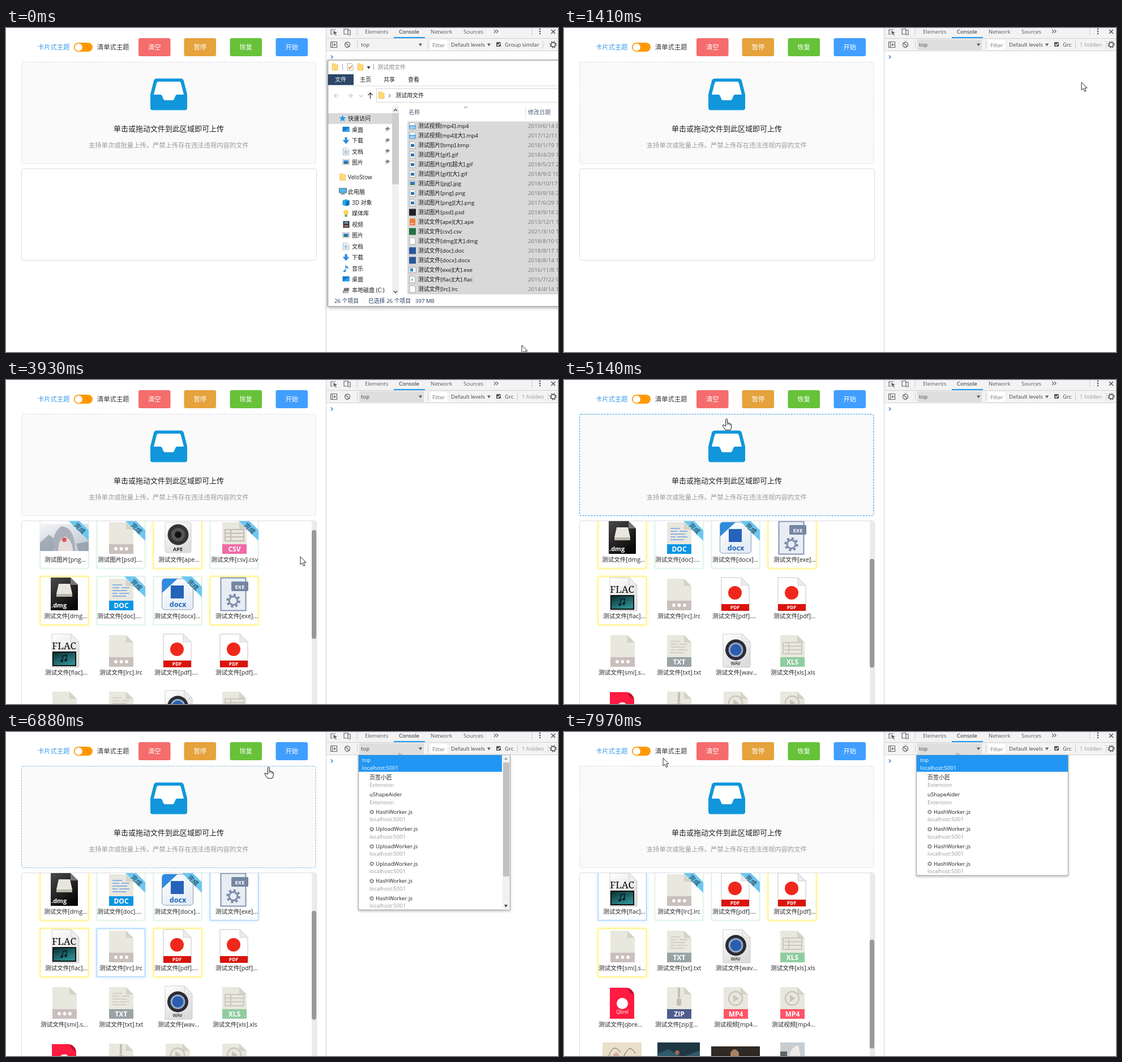
Recreate the animation shown at these times as an HTML page. Size 975 by 574 pixels, loop 8000 ms.

```html
<!DOCTYPE html>
<html lang="zh-CN">
<head>
<meta charset="utf-8">
<title>上传演示</title>
<style>
html, body { margin: 0; width: 100%; height: 100%; overflow: hidden; background: #fff; }
svg { display: block; width: 100vw; height: 100vh; }
text { font-family: "Open Sans", "Noto Sans CJK SC", "Noto Sans CJK", sans-serif; }
.frame { fill: #fff; stroke: none; stroke-width: 1.5; }
.hash { stroke: #fff27a; filter: drop-shadow(0 0 3px #fff59a); }
.send { stroke: #a9d5ff; filter: drop-shadow(0 0 3px #cfe8ff); }
.done { stroke: #d8f1e0; filter: drop-shadow(0 0 2px #eef9f1); }
</style>
</head>
<body>
<svg id="stage" viewBox="0 0 975 574"></svg>
<script>
const LOOP = 8000, STEP = 109.3;

// Drawing helpers
const text = (x, y, s, size = 10, fill = '#1a1a1a', more = '') =>
  `<text x="${x}" y="${y}" font-size="${size}" fill="${fill}" ${more}>${s}</text>`;
const mid = (x, y, s, size, fill, more = '') => text(x, y, s, size, fill, 'text-anchor="middle" ' + more);
const box = (x, y, w, h, fill, more = '') =>
  `<rect x="${x}" y="${y}" width="${w}" height="${h}" fill="${fill}" ${more}/>`;
const path = (d, fill = 'none', more = '') => `<path d="${d}" fill="${fill}" ${more}/>`;
const line = (d, color, width = 1) => path(d, 'none', `stroke="${color}" stroke-width="${width}"`);
const disc = (x, y, r, fill, more = '') => `<circle cx="${x}" cy="${y}" r="${r}" fill="${fill}" ${more}/>`;
const group = (x, y, inner, more = '') => `<g transform="translate(${x} ${y})" ${more}>${inner}</g>`;
const gear = (x, y, r, color) =>
  disc(x, y, r * .62, 'none', `stroke="${color}" stroke-width="${r * .24}"`) +
  disc(x, y, r * .88, 'none', `stroke="${color}" stroke-width="${r * .3}" stroke-dasharray="${r * .3456}"`);
const gradient = (id, a, b) =>
  `<linearGradient id="${id}" x2=".6" y2="1"><stop stop-color="${a}"/><stop offset="1" stop-color="${b}"/></linearGradient>`;

const defs = `<defs>
  <clipPath id="listClip"><path d="M28 250h512v324h-512z"/></clipPath>
  <clipPath id="cardClip"><path d="M0 0h86v86h-86z"/></clipPath>
  <clipPath id="groupClip"><path d="M880 20h16v20h-16z"/></clipPath>` +
  gradient('artFill', '#f3f3f4', '#c3cdd6') + gradient('metalFill', '#fff', '#dcdcdc') +
  gradient('coalFill', '#4a4a4a', '#090909') + gradient('dragFill', '#eff6fa', '#c9e3f2') +
  gradient('tealFill', '#0b2a2e', '#2d8f93') + gradient('wordFill', '#fff', '#e3ecf6') + '</defs>';

// Upload page
function header() {
  const buttons = [[234, '清空', '#f56c6c'], [314.5, '暂停', '#e6a23c'], [395.5, '恢复', '#67c23a'], [476.5, '开始', '#409eff']];
  return text(56, 38, '卡片式主题', 11.3, '#3a9be8') + box(120, 26, 33, 16, '#ff9800', 'rx="8"') +
    disc(128.3, 34, 6.6, '#fff') + text(161, 38, '清单式主题', 11.3, '#303133') +
    buttons.map(([x, s, c]) => box(x, 18, 56.5, 32, c, 'rx="3"') + mid(x + 28.2, 38, s, 11.3, '#fff')).join('');
}
function dropArea() {
  const border = c => box(27.5, 60.5, 519.5, 180, 'none', `rx="3" stroke="${c}" stroke-dasharray="3 2"`);
  return box(27.5, 60.5, 519.5, 180, '#fafafa', 'rx="3"') + border('#d9d9d9') +
    `<g id="hover">${border('#2a9af3')}</g>` +
    path('M267 89.500h41q5 0 6 4l6 24v24q0 4-4 4h-57q-4 0-4-4v-24l6-24q1-4 6-4z', '#1296db') +
    path('M269 95h37q2 0 3 3l5 20h-12q-2 0-3 3l-2 5q-1 2-3 2h-13q-2 0-3-2l-2-5q-1-3-3-3h-12l5-20q1-3 3-3z', '#fff') +
    text(190, 182.5, '单击或拖动文件到此区域即可上传', 13, '#222') +
    text(146, 212, '支持单次或批量上传。严禁上传存在违法违规内容的文件', 11.32, '#999');
}

// Card icons, drawn from the card's top left corner
const sheet = (art, band, label) =>
  path('M22 4h30l13 13v43h-43z', '#e8e8de') + path('M52 4l13 13h-13z', '#d3d3c6') + art +
  box(22, 43, 43, 17, band) +
  (label ? mid(43.5, 56, label, 12, '#fff', 'font-weight="700"') : [34, 43.5, 53].map(x => disc(x, 51, 2.9, '#fff')).join(''));
const rows = color => line('M28 15h17M28 20h12M44 20h14M28 25h26M28 30h9M40 30h18M28 35h24', color, 2);
const cells = color => line('M27 17h33v20h-33zM27 23.500h33M27 30h33M37 17v20', color, 2);
const play = disc(43, 24, 12, 'none', 'stroke="#c9c5bd" stroke-width="2.5"') + path('M39 17.500v13l10-6.500z', '#c9c5bd');
const paper = path('M21 2h34l14 14v43q0 2-2 2h-46z', 'url(#metalFill)', 'stroke="#bbb" stroke-width=".7"') +
  path('M55 2v14h14z', '#eee', 'stroke="#bbb" stroke-width=".6"');
const pdf = path('M18 2h35l14 14v44h-49z', '#fff', 'stroke="#b5b5b5" stroke-width=".8"') +
  path('M53 2v14h14z', '#ececec', 'stroke="#bbb" stroke-width=".6"') + disc(42, 29, 12, '#f0281c') +
  box(18, 49, 49, 12, '#d9140c') + mid(42, 58, 'PDF', 8.5, '#fff', 'font-weight="700"');
const icons = {
  art: box(0, 7, 86, 48, 'url(#artFill)') + path('M0 40l16-14 12 9-4 20h-24zM86 38l-22 4 4 13h18z', '#7d8c9a', 'opacity=".6"') +
    path('M26 55q-8-30 12-44q24 2 24 44z', '#a9b0bb') + path('M32 55q0-20 12-26q14 8 14 26z', '#e6dcdb') + disc(43, 35, 4, '#d65a58'),
  blank: sheet('', '#c9bfbc'),
  ape: box(21, 4, 46, 54, 'url(#metalFill)', 'rx="4" stroke="#d0d0d0"') + disc(44, 26, 18.500, '#333') +
    disc(44, 26, 12, '#555') + disc(44, 26, 6, '#111') + mid(43.500, 55, 'APE', 9, '#222', 'font-weight="700"'),
  csv: sheet(cells('#c5bbb6'), '#f06ba6', 'CSV'),
  dmg: path('M19 2h35l13 13v45h-48z', 'url(#coalFill)') + path('M54 2v13h13z', '#777') +
    path('M33 13h20l4 18v4h-28v-4z', '#e9e6df') + path('M29 31h28v5h-28z', '#bbb5ab') +
    text(20, 55, '.dmg', 11, '#fff', 'font-weight="700"'),
  doc: sheet(rows('#8fb2e4'), '#0b95e4', 'DOC'),
  docx: box(15.500, 4, 55, 55, 'url(#wordFill)', 'rx="5" stroke="#8c9aa8"') + path('M16 29v-20q0-5 5-5h22z', '#2e8be0') +
    box(31, 16, 23, 23, '#2563b8') + mid(43.500, 54, 'docx', 12.500, '#1d62b5', 'font-weight="700"'),
  exe: box(19.500, 2.500, 44, 58, '#e9edf3', 'stroke="#8394b2" stroke-width="2"') + box(38, 9, 30, 17, '#7586a3', 'rx="2"') +
    mid(53, 21.500, 'EXE', 9.500, '#fff', 'font-weight="700"') + gear(41.500, 43, 12, '#7a8ba8'),
  flac: paper + `<text x="42.500" y="29" font-size="17" text-anchor="middle" style="font-family:'Noto Serif',serif">FLAC</text>` +
    box(23, 34, 40, 24, 'url(#tealFill)', 'stroke="#111" stroke-width="2"') +
    path('M40 50v-9l7-2v9', 'none', 'stroke="#071a1c" stroke-width="1.5"') + disc(38.500, 50, 2.200, '#071a1c') + disc(45.500, 48.500, 2.200, '#071a1c'),
  pdf,
  txt: sheet(rows('#d0d0c6'), '#98a4a5', 'TXT'),
  wav: paper + disc(43.500, 30, 18.500, '#2b2b33') + disc(43.500, 30, 13, '#93a9c9') + disc(43.500, 30, 10, '#2a5dad') +
    mid(43, 57, 'WAV', 8, '#333', 'font-weight="600"'),
  xls: sheet(cells('#cbc7bf'), '#8fcd9f', 'XLS'),
  mind: path('M21 5h31q2 9 12 12v43h-43z', '#ff1b41') + path('M52 5q9 2 12 12q-9 0-12-12z', '#c50f2f') +
    disc(43, 33, 10, '#fff') + mid(43, 51, 'Qbrel', 8.500, '#fff'),
  zip: sheet(line('M43 5v18', '#c2beb6', 4) + box(39, 24, 8, 13, '#c2beb6', 'rx="3"'), '#4e5d8c', 'ZIP'),
  mp4: sheet(play, '#ff5468', 'MP4'),
  sketch: box(8, 2, 69, 60, '#eadfcb') + path('M18 30q8-30 22-10M46 26q10-24 20-4', 'none', 'stroke="#6b6358"') + disc(32, 25, 5, '#dda9a0'),
  scene: box(5, 2, 75, 60, '#1f3743') + path('M5 22l20-8 24 14 31-12v46h-75z', '#30596a') + disc(40, 20, 4, '#a06657'),
  hall: box(0, 9, 86, 60, '#302822') + path('M20 45q3-16 14-17v-8q7-12 15 0v8q11 3 15 17z', '#a78164'),
  room: box(22, 2, 43, 60, '#c6ced4') + path('M40 62q-10-50 14-55l11 55z', '#eeeae6') + box(22, 18, 12, 44, '#5f6467')
};

// icon, label offset, label, then times of hash / send / done
const cards = [
  ['art', 8, '测试图片[png...', 1950, 2610, 2850], ['blank', 2, '测试图片[psd]....', 2060, 2850, 3080],
  ['ape', 9, '测试文件[ape...', 2160], ['csv', 2, '测试文件[csv].csv', 2850, 3080, 3200],
  ['dmg', 7, '测试文件[dmg...', 2970], ['doc', 1, '测试文件[doc]....', 3080, 3320, 3600],
  ['docx', 2, '测试文件[docx]...', 3320, 3720, 3930], ['exe', 10, '测试文件[exe]...', 3480, 6560],
  ['flac', 9, '测试文件[flac]...', 5030, 7420], ['blank', 5, '测试文件[lrc].lrc', 5350, 6670, 7640],
  ['pdf', 2, '测试文件[pdf]....', 6670, 7310, 7750], ['pdf', 10, '测试文件[pdf]...', 7420],
  ['blank', 1, '测试文件[smi].s...', 7640], ['txt', 4, '测试文件[txt].txt'],
  ['wav', 8, '测试文件[wav...'], ['xls', 5, '测试文件[xls].xls'],
  ['mind', 1, '测试文件[qbre...'], ['zip', 1, '测试文件[zip][...'],
  ['mp4', 5, '测试视频[mp4...'], ['mp4', 7, '测试视频[mp4...'],
  ['sketch', 0, ''], ['scene', 0, ''], ['hall', 0, ''], ['room', 0, '']
];
const ribbon = `<g class="ribbon" clip-path="url(#cardClip)">${path('M49 0h19l18 18v19z', '#6cc7f1')}` +
  mid(70.500, 19, '完成', 11, '#1b2b35', 'transform="rotate(45 70.5 15)"') + '</g>';
const card = ([icon, dx, label], i) => group(60 + i % 4 * 100, 279 + (i >> 2) * 100,
  `<rect class="frame" x=".5" y=".5" width="85" height="85"/>` + icons[icon] + text(dx, 73.500, label, 10.6, '#222') + ribbon, 'class="card"');
const list = () =>
  `<rect id="panel" x="27.5" y="249.5" width="521" height="162" rx="3" fill="#fff" stroke="#d9dce2"/>` +
  `<g id="files">${box(540, 250, 8, 330, '#ececec')}<rect id="thumb" x="540" width="8" height="193" rx="4" fill="#999"/>` +
  `<g clip-path="url(#listClip)"><g id="scroller">${cards.map(card).join('')}</g></g></g>`;

// Developer tools
const down = (x, y, c = '#5a5a5a', s = 3) => path(`M${x - s} ${y - s * .7}h${s * 2}l${-s} ${s * 1.6}z`, c);
function devtools() {
  const label = (x, s, c = '#5a5a5a', y = 10) => text(x, y, s, 9.6, c);
  const sep = (x, y) => line(`M${x} ${y}v13`, '#ccc');
  return box(566, 0, 409, 41, '#f3f3f3') + line('M565.5 0v574M566 18.500h409M566 40.500h409', '#cfcfcf') +
    line('M582 3h-8v8h3M597 2h7v9h-7zM603 4h5v8h-4', '#666', 1.2) + path('M578 5l7 3-3 1 2 4-2 0-1-3-2 2z', '#666') + sep(620.500, 0) +
    label(634, 'Elements') + label(694, 'Console', '#222') + label(750, 'Network') + label(808, 'Sources') +
    box(685, 16, 55, 2, '#1a9af5') + line('M862 3l3 3-3 3M866 3l3 3-3 3', '#666', 1.2) + sep(928.500, 0) +
    [2, 6, 10].map(y => disc(943, y, 1.300, '#555')).join('') + line('M963 3l7 7M970 3l-7 7', '#444', 1.300) +
    line('M573.500 24.500h11v10h-11zM576.500 24.500v10', '#666', 1.2) + path('M579 27v5l4-2.500z', '#666') +
    disc(603, 29.500, 4.500, 'none', 'stroke="#666" stroke-width="1.3"') + line('M600 26.500l6 6', '#666', 1.300) + sep(620.500, 23) +
    `<g id="select">${box(624, 20, 114, 19, '#dedede')}</g>` + label(627, 'top', '#444', 33) + down(732, 29.500) + sep(745.500, 23) +
    box(750, 21, 29, 17, '#fff') + label(753, 'Filter', '#777', 33.500) + label(786, 'Default levels', '#444', 33) + down(853, 29.500) +
    box(866, 25, 8, 8, '#555', 'rx="1"') + line('M867.500 29l2 2 3.500-4', '#fff', 1.300) +
    `<g id="fullBar">${label(881, 'Group similar', '#444', 33)}${sep(948.500, 23)}</g>` +
    `<g id="shortBar"><g clip-path="url(#groupClip)">${label(881, 'Group', '#444', 33)}</g>${sep(903.500, 23)}` +
    label(911, '1 hidden', '#999', 33) + sep(957.500, 23) + '</g>' + gear(966.500, 29.500, 6, '#555') +
    line('M574 48.500l3 2.700-3 2.700', '#2a7fe0', 1.400);
}
function menu(id, workers, height, scroll) {
  const items = [['页签小匠', 'Extension'], ['uShapeAider', 'Extension'], ...workers.map(w => [w + 'Worker.js', 'localhost:5001'])];
  return `<g id="${id}">` + box(622.500, 41, 268, height, '#fff', 'stroke="#a5a5a5" style="filter:drop-shadow(0 2px 2px #0004)"') +
    box(623, 41, scroll ? 253 : 267, 29.500, '#2196f3') + text(629, 53, 'top', 9.6, '#fff') + text(629, 66.500, 'localhost:5001', 9.5, '#fff') +
    items.map(([a, b], i) => {
      const y = 83.500 + i * 30.600;
      return (i > 1 ? gear(646, y - 3, 3.800, '#555') : '') + text(i > 1 ? 653 : 642, y, a, i ? 9.6 : 10, '#222') + text(642, y + 13.400, b, 9.5, '#999');
    }).join('') +
    (scroll ? box(877, 41, 13, 274, '#f1f1f1') + box(878, 54, 11, 202, '#c1c1c1') + path('M880 49h6l-3-4z', '#999') + down(883, 308, '#444') : '') + '</g>';
}

// File explorer
const folder = (x, y) => path(`M${x} ${y}h5l1 2h4v10h-10z`, '#ffd975', 'stroke="#e5b84f" stroke-width=".6"');
const page = (x, y) => path(`M${x} ${y}h7l3 3v9h-10z`, '#fff', 'stroke="#999" stroke-width=".8"');
const picture = (x, y) => box(x, y + 1, 12, 9, '#fff', 'stroke="#999" stroke-width=".7"') + box(x + 1.5, y + 2.500, 9, 6, '#3a86c8') + path(`M${x + 1.500} ${y + 8.500}l4-3 5 3z`, '#2f5c46');
const glyphs = {
  star: path('M6 0l1.700 4 4.300.4-3.300 2.800 1 4.300-3.700-2.300-3.700 2.300 1-4.300-3.300-2.800 4.300-.4z', '#2c9be8'),
  screen: box(0, 1, 12, 9, '#1877c9') + path('M0 10l12-8v8z', '#2fa2ef'),
  down: path('M4 0h4v5h4l-6 7-6-7h4z', '#2d8ae0'),
  doc: page(1, 0) + line('M3 4h5M3 6.500h6M3 9h6', '#3c8fcf'),
  pic: picture(0, 0),
  folder: folder(1, 0),
  pc: box(0, 0, 13, 8, '#55b4f0', 'stroke="#477"') + box(3, 9, 7, 2, '#789'),
  cube: path('M6 0l6 2v8l-6 2-6-2v-8z', '#22a7df') + path('M6 4l6-2v8l-6 2z', '#0b6fb0'),
  lib: box(2, 0, 8, 8, '#ffd45c') + box(4, 8, 4, 4, '#58a847'),
  film: box(1, 0, 11, 12, '#333') + box(3, 1, 7, 4, '#6a8cb0') + box(3, 7, 7, 4, '#9a6a60'),
  note: path('M5 0l5 4v3l-4-3v6q-1 3-4 2t3-4z', '#2289e6'),
  disk: path('M3 2h9l-2 9h-10z', '#777') + box(2, 8, 8, 2, '#ddd'),
  mp4: page(1, 0) + box(0, 5, 12, 6, '#379be8') + mid(6, 10, 'MP4', 4.500, '#fff', 'font-weight="700"'),
  img: page(1, 0) + box(3, 4, 6, 5, '#236fb4'),
  jpg: picture(0, 0), psd: box(0, 0, 12, 12, '#21202a'), ape: box(1, 0, 10, 12, '#f07c3c', 'rx="1"') + line('M3 9h6', '#fff'),
  csv: box(0, 0, 12, 12, '#1f7145'), word: box(0, 0, 12, 12, '#2a5699'), page: page(1, 0),
  exe: box(0, 1, 12, 10, '#fff', 'stroke="#888" stroke-width=".7"') + box(2, 3, 5, 6, '#2b8bcf'),
  flac: page(1, 0) + path('M4 4v5l4-2.500z', '#6cc7d8')
};
const glyphOf = { bmp: 'img', gif: 'img', png: 'img', doc: 'word', docx: 'word', dmg: 'page', lrc: 'page' };
const kinds = { mp4: '视频', bmp: '图片', gif: '图片', jpg: '图片', png: '图片', psd: '图片' };
const fileRows = `mp4||2019/6/14 9:,mp4|[大]|2017/12/11,bmp||2018/1/19 1,gif||2018/4/29 1,gif|[超大]|2018/5/27 2,gif|[大]|2018/9/2 19,
jpg||2018/10/17,png||2018/9/18 2,png|[大]|2017/6/29 1,psd||2018/9/18 2,ape|[大]|2013/12/1 1,csv||2021/3/10 1,dmg|[大]|2018/8/10 9,
doc||2018/8/17 1,docx||2018/8/14 1,exe|[大]|2016/11/8 1,flac|[大]|2015/7/22 9,lrc||2014/4/14 1`.split(/,\s*/).map(s => s.split('|'));
const places = [['star', '快速访问', 160, 1], ['screen', '桌面', 180], ['down', '下载', 199.500], ['doc', '文档', 219], ['pic', '图片', 238],
  ['folder', 'VeloStow', 264, 1], ['pc', '此电脑', 290, 1], ['cube', '3D 对象', 309.500], ['lib', '媒体库', 328.500], ['film', '视频', 348],
  ['pic', '图片', 367.500], ['doc', '文档', 387], ['down', '下载', 406.500], ['note', '音乐', 426], ['screen', '桌面', 445], ['disk', '本地磁盘 (C:)', 464.500]];
function explorer() {
  const file = ([ext, tag, date], i) => {
    const y = 165.500 + i * 17;
    return box(709, y, 266, 16, '#d9d9d9') + line(`M709 ${y + 16.500}h266`, '#bcbcbc') + group(712, y + 2, glyphs[glyphOf[ext] || ext]) +
      text(728, y + 11.500, `测试${kinds[ext] || '文件'}[${ext}]${tag}.${ext}`, 9.8, '#111') + text(922, y + 11.500, date, 9.8, '#777');
  };
  const place = ([icon, name, y, top]) => group(top ? 588.500 : 594.500, y - 6, glyphs[icon]) + text(top ? 604 : 611, y + 3.700, name, 10);
  const pin = y => path(`M674 ${y - 5}l4 4-2 0-2 3-4-4 3-1zM672 ${y + 1}l-2 3`, '#888', 'stroke="#888" stroke-width=".8"');
  return '<g id="explorer">' + box(568.500, 57, 420, 436, '#fff', 'stroke="#808080" style="filter:drop-shadow(0 2px 3px #0005)"') +
    folder(576, 63) + folder(621, 63) + page(603, 63) + line('M605 69l2 3 4-5', '#d98324', 1.500) + down(640.500, 70, '#333') +
    line('M594.500 64v10M649.500 64v10', '#999') + text(656, 73, '测试用文件', 10, '#8a8a8a') +
    box(569, 82, 45, 19, '#2b4768') + text(581, 95, '文件', 10, '#fff') + text(625, 95, '主页') + text(667, 95, '共享') + text(710, 95, '查看') +
    line('M569 102.500h406', '#ddd') + line('M589 120h-9m4-4l-4 4 4 4M603 120h9m-4-4l4 4-4 4M624 119l3 3 3-3', '#c4c4c4', 1.200) +
    line('M643.500 125v-10m-4 4l4-4 4 4', '#444', 1.400) + box(654.500, 107.500, 330, 24, '#fff', 'stroke="#d4d4d4"') + folder(658, 113) +
    line('M676 117l3 3-3 3', '#444') + text(688, 123, '测试用文件') +
    box(569, 151, 113, 19, '#d9d9d9') + places.map(place).join('') + [180, 200, 219, 238].map(pin).join('') +
    box(682, 139, 12, 334, '#f0f0f0') + box(682, 151, 12, 126, '#cdcdcd') + line('M685 147l3-3 3 3M685 466l3 3 3-3', '#444', 1.400) +
    text(711, 153, '名称', 10, '#4c607a') + line('M809 142l3-3 3 3', '#777') + line('M917.500 138v22', '#ddd') + text(922, 153, '修改日期', 10, '#4c607a') +
    fileRows.map(file).join('') + box(569, 472.500, 406, 20, '#fff') +
    text(580, 486.500, '26 个项目', 9.8, '#1e395b') + line('M631.500 477v11', '#eee') + text(640, 486.500, '已选择 26 个项目', 9.8, '#1e395b') + text(723, 486.500, '397 MB', 9.6, '#1e395b') + '</g>';
}

// Pointer, drawn around its hot spot
const arrowShape = path('M0 0v14l3.200-3 2.400 5.400 2.400-1-2.400-5.200h4.400z', '#fff', 'stroke="#111" stroke-width=".9"');
const pointer = () => '<g id="pointer">' +
  `<g id="drag">${box(-42, -75, 86, 87, 'url(#dragFill)', 'opacity=".84" stroke="#fff" style="filter:drop-shadow(1px 1px 1px #0007)"')}` +
  box(-9, -40, 18, 14, '#0a66cc') + mid(0, -29.500, '26', 9.5, '#fff', 'font-weight="700"') + '</g>' +
  `<g id="press">${disc(0, 1, 11, '#f2ee3c', 'opacity=".75"')}</g>` +
  `<g id="tip">${box(9.500, 11.500, 40, 15, '#fff', 'stroke="#777"')}${line('M12 19h9m-4-4l4 4-4 4', '#1d4fa0', 1.200)}${text(25, 23, '移动', 10, '#1d4fa0')}</g>` +
  `<g id="arrow">${arrowShape}</g>` +
  `<g id="hand">${path('M-1.500 1q1.500-2 3 0v6q4 0 7 3v4q0 3-2 6h-8l-5-7q-1-3 1.500-2l3.500 2z', '#fff', 'stroke="#111"')}${line('M1.500 7v4M4 8v3M6.500 9v3', '#111', .8)}</g></g>`;

const stage = document.getElementById('stage');
stage.innerHTML = defs + header() + dropArea() + list() + devtools() +
  `<g id="trace" opacity=".3">${path('M693 36l10 5-4 1 2 5-3 1-2-5-3 2z', '#666')}</g>` +
  menu('longMenu', ['Hash', 'Upload', 'Upload', 'Upload', 'Hash', 'Hash'], 274, true) +
  menu('shortMenu', ['Hash', 'Hash', 'Hash', 'Hash'], 213, false) + explorer() + pointer();

// Motion
const moves = [[80, 911, 562], [400, 790, 309], [510, 760, 302], [730, 341, 168], [940, 341, 165], [1180, 640, 118], [1380, 914, 96],
  [1800, 914, 96], [2266, 853, 121], [2590, 790, 127], [2900, 690, 160], [3460, 519, 270], [3680, 520, 313], [4760, 520, 313],
  [5105, 288, 69], [5300, 230, 54], [5540, 177, 44], [5650, 215, 38], [5870, 480, 18], [6080, 711, 28], [6200, 693, 33],
  [6450, 693, 33], [6856, 464, 62], [7180, 330, 82], [7400, 250, 72], [7700, 178, 50], [7940, 175, 46]];
const scrolls = [[1900, 0], [2140, 31], [4800, 31], [5030, 131], [7400, 131], [7640, 231]];
function sample(keys, t) {
  const i = keys.findIndex(k => k[0] > t);
  if (i < 1) return (i ? keys[keys.length - 1] : keys[0]).slice(1);
  const a = keys[i - 1], b = keys[i], f = (t - a[0]) / (b[0] - a[0]);
  return a.slice(1).map((v, j) => v + (b[j + 1] - v) * f);
}
const inArea = (x, y) => x > 28 && x < 547 && y >= 60 && y < 241;
const onButton = (x, y) => y > 18 && y < 50 && x > 234 && x < 533 && (x - 234) % 80.800 < 56;
const el = id => document.getElementById(id);
const show = (id, on) => el(id).style.display = on ? '' : 'none';
const cardEls = [...document.querySelectorAll('.card')];
const states = ['', 'hash', 'send', 'done'];

function render(t) {
  const held = 80 + Math.max(0, Math.floor((t - 80) / STEP)) * STEP;
  const [x, y] = sample(moves, held);
  const hover = time => time > 830 && inArea(...sample(moves, time)) ? .5 : 0;
  const hand = t >= 860 && (inArea(x, y) || onButton(x, y));
  const dragging = t >= 530 && t < 860;
  el('pointer').setAttribute('transform', `translate(${x.toFixed(1)} ${y.toFixed(1)})`);
  el('hover').style.opacity = hover(held) + hover(held - 2 * STEP);
  show('hand', hand);
  show('arrow', !hand);
  show('drag', dragging);
  show('tip', dragging && x < 560);
  show('press', t >= 430 && t < 860);

  const open = t >= 860;
  show('explorer', !open);
  show('select', open);
  show('fullBar', t < 1200);
  show('shortBar', t >= 1200);
  show('trace', t >= 6450);
  show('longMenu', t >= 6450 && t < 7530);
  show('shortMenu', t >= 7530);

  const loaded = t >= 1840, [top] = sample(scrolls, held);
  show('files', loaded);
  el('panel').setAttribute('height', loaded ? 379 : 162);
  el('scroller').setAttribute('transform', `translate(0 ${-top})`);
  el('thumb').setAttribute('y', 250 + top * .51);
  cardEls.forEach((node, i) => {
    const level = cards[i].slice(3).filter(time => t >= time).length;
    node.querySelector('.frame').setAttribute('class', 'frame ' + states[level]);
    node.querySelector('.ribbon').style.display = level === 3 ? '' : 'none';
  });
}
const start = performance.now();
function tick() {
  render((performance.now() - start) % LOOP);
  requestAnimationFrame(tick);
}
tick();
</script>
</body>
</html>
```
